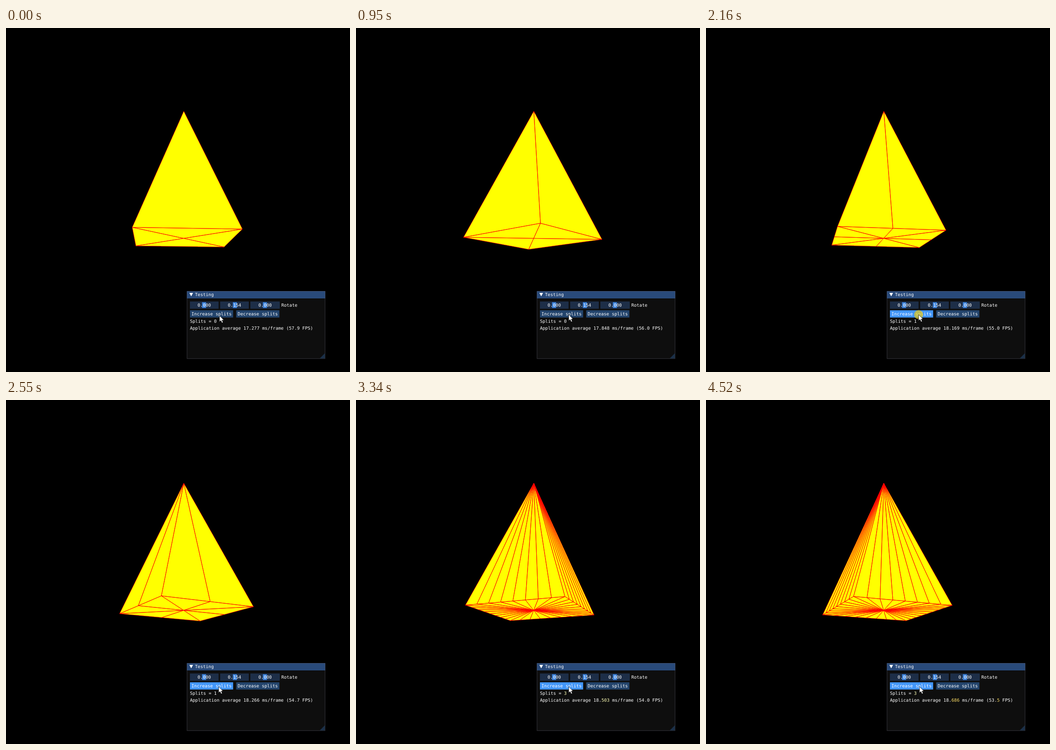
Recreate the animation shown at these times as an HTML page. Size 748 by 748 pixels, loop 4.55 s.

```html
<!DOCTYPE html>
<html lang="en">
<head>
<meta charset="utf-8">
<title>Pyramid splits</title>
<style>
  html, body { margin: 0; width: 100%; height: 100%; overflow: hidden; background: #000; }
  svg { display: block; width: 100%; height: 100%; }
  text {
    font: 11.63px "DejaVu Sans Mono", monospace;
    fill: #fff; white-space: pre; text-rendering: geometricPrecision;
  }
</style>
</head>
<body>
<svg viewBox="0 0 748 748">
  <rect width="748" height="748"/>
  <path id="solid" fill="#ff0" stroke="#f00" stroke-width=".85" stroke-linejoin="bevel" shape-rendering="crispEdges"/>

  <g transform="translate(393.3 572.2) scale(.8313)">
    <rect width="362" height="177" fill="#0e0e0e"/>
    <rect width="362" height="19" fill="#294a7a"/>
    <rect x=".5" y=".5" width="361" height="176" fill="none" stroke="#6e6e80" stroke-opacity=".5"/>
    <path d="M6.5 4.7h9.6l-4.8 9z" fill="#fff"/>
    <path d="M361 162.5v13.5h-13.5z" fill="#1b3049"/>
    <text x="21.3" y="13.5">Testing</text>

    <g id="sliders"></g>
    <text x="247" y="40.3">Rotate</text>

    <rect id="button" x="8" y="50" width="113" height="19"/>
    <rect x="129" y="50" width="113" height="19" fill="#23446c"/>
    <text x="12" y="63.3">Increase splits</text>
    <text x="133" y="63.3">Decrease splits</text>
    <text x="8" y="83.3">Splits = <tspan id="count"></tspan></text>
    <text x="8" y="100.3">Application average <tspan id="whole"></tspan><tspan id="milli"></tspan> ms/frame (<tspan id="fps"></tspan><tspan id="tenth"></tspan> FPS)</text>
  </g>

  <g id="cursor">
    <circle id="halo" r="9.7" fill="#e6c814" fill-opacity=".7"/>
    <path d="M0 0V13.4L3.1 10.5 5.4 15.8 7.8 14.8 5.5 9.7H9.6Z" fill="#fff" stroke="#000" stroke-width=".7"/>
  </g>
</svg>
<script>
const LOOP = 4550;
const $ = id => document.getElementById(id);

// Keys: [time, value]
const TURN = [[0, 40.7], [530, 17], [950, -4.7], [1615, -30.7], [2160, -54.6], [2680, -80.7],
  [2940, -91.5], [3340, -112.6], [3720, -130], [3819, -130], [4050, -140.1],
  [4270, -150], [4369, -150], [4520, -158.3]];
const MILLIS = [[0, 17.276], [950, 17.848], [2160, 18.169], [2940, 18.362],
  [3340, 18.503], [4050, 18.479], [4520, 18.686]];
const CURSOR_X = [[0, 464.2], [950, 462.5], [2160, 462.3], [3340, 462.5], [4050, 463], [4520, 464.2]];
const CURSOR_Y = [[0, 625.5], [950, 623.3], [4520, 623.3]];
const CLICKS = [2140, 2640, 3140];
const PRESS = 80, HALO_TAIL = 35;

// Screen mapping of the base plane; the apex stays put
const APEX = [386.6, 181], CENTRE = [386.3, 457.4];
const WIDE = 151, DEEP = 27.8, PERSPECTIVE = 0.158;

function at(keys, t) {
  const i = keys.findIndex(k => k[0] > t);
  if (i < 0) return keys[keys.length - 1][1];
  const [t0, a] = keys[i - 1], [t1, b] = keys[i];
  return a + (b - a) * (t - t0) / (t1 - t0);
}

function project(x, z) {
  const s = 1 / (1 - PERSPECTIVE * z);
  return [CENTRE[0] + WIDE * x * s, CENTRE[1] - DEEP * z * s];
}

function rim(deg, parts) {
  const corner = k => {
    const a = (deg + 90 * k) * Math.PI / 180;
    return [Math.cos(a), Math.sin(a)];
  };
  const points = [];
  for (let k = 0; k < 4; k++) {
    const [x0, z0] = corner(k), [x1, z1] = corner(k + 1);
    for (let j = 0; j < parts; j++) {
      const u = j / parts;
      points.push(project(x0 + (x1 - x0) * u, z0 + (z1 - z0) * u));
    }
  }
  return points;
}

const triangle = (...pts) =>
  "M" + pts.map(p => p[0].toFixed(2) + " " + p[1].toFixed(2)).join("L") + "Z";

function facesCamera(p, q) {
  return (p[0] - APEX[0]) * (q[1] - APEX[1]) > (p[1] - APEX[1]) * (q[0] - APEX[0]);
}

function pyramid(deg, splits) {
  const points = rim(deg, 2 ** splits);
  return points.map((p, i) => {
    const q = points[(i + 1) % points.length];
    return triangle(CENTRE, p, q) + (facesCamera(p, q) ? triangle(APEX, p, q) : "");
  }).join("");
}

function label(id, text, tint) {
  $(id).textContent = text;
  $(id).style.fill = tint;
}

function draw(t) {
  const splits = CLICKS.filter(c => t >= c).length;
  const pressed = CLICKS.some(c => t >= c - PRESS && t < c);
  const halo = CLICKS.some(c => t >= c - PRESS && t < c + HALO_TAIL);
  $("solid").setAttribute("d", pyramid(at(TURN, t), splits));
  $("button").setAttribute("fill", pressed ? "#0f87fa" : splits ? "#4296fa" : "#23446c");
  $("halo").setAttribute("visibility", halo ? "visible" : "hidden");
  $("cursor").setAttribute("transform", `translate(${at(CURSOR_X, t)} ${at(CURSOR_Y, t)})`);

  const ms = at(MILLIS, t), time = ms.toFixed(3), rate = (1000 / ms).toFixed(1);
  const tint = t < 2700 ? "#fff" : t < 3700 ? "#ffffb8" : t < 4370 ? "#ffff80" : "#ffe068";
  label("count", splits, splits > 1 ? "#ffffb8" : "#fff");
  label("whole", time.slice(0, 3), "#fff");
  label("milli", time.slice(3), tint);
  label("fps", rate.slice(0, 3), "#fff");
  label("tenth", rate.slice(3), t < 3700 ? "#fff" : tint);
}

// Slider: left edge, width, grab left edge, value
$("sliders").innerHTML = [[8, 75, 39.7, "0.000"], [87, 75, 120.3, "0.154"], [166, 77, 198.8, "0.000"]]
  .map(([x, w, grab, value]) =>
    `<rect x="${x}" y="27" width="${w}" height="19" fill="#1d2e48"/>` +
    `<rect x="${grab}" y="29" width="10.5" height="15" fill="#3d85e0"/>` +
    `<text x="${x + w / 2}" y="40.3" text-anchor="middle">${value}</text>`).join("");

const start = performance.now();
function tick() {
  draw((performance.now() - start) % LOOP);
  requestAnimationFrame(tick);
}
tick();
</script>
</body>
</html>
```
